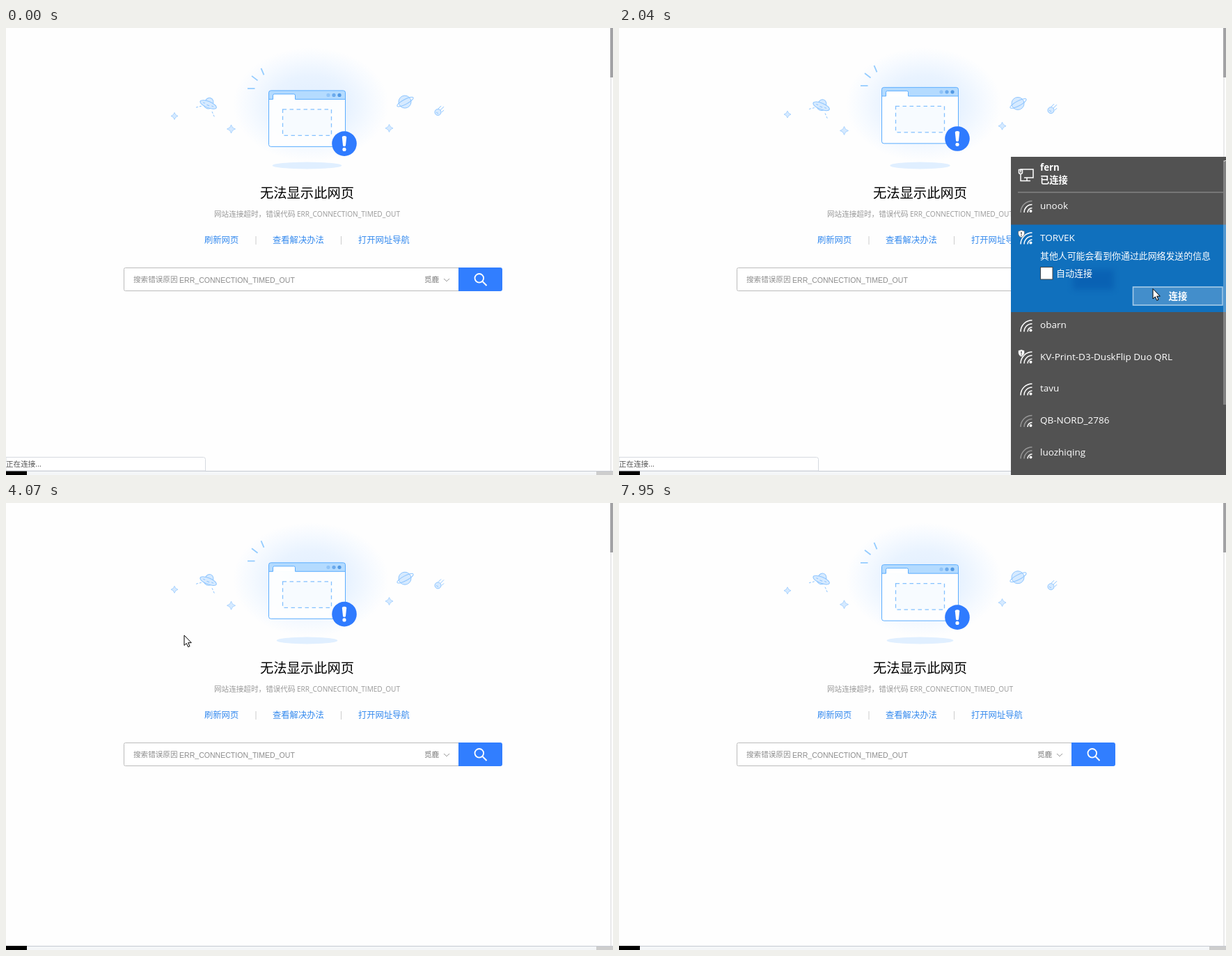
An HTML page that plays this animation: 872 px wide and 642 px high, repeating every 8000 ms.

```html
<!DOCTYPE html>
<html lang="zh-CN">
<head>
<meta charset="utf-8">
<title>无法显示此网页</title>
<style>
  html, body { margin: 0; width: 100%; height: 100%; overflow: hidden; background: #fefefe; }
  svg { display: block; width: 872px; height: 642px; }
  text { font-family: "Open Sans", "Noto Sans CJK SC", "Noto Sans CJK", sans-serif; white-space: pre; }
  #panel text { font-weight: 500; }
  #panel .bold { font-weight: 700; }
  .arial { font-family: "Liberation Sans", "Noto Sans CJK SC", "Noto Sans CJK", sans-serif; }
  .mid { text-anchor: middle; }
  .pale { fill: #d6eaff; stroke: #8dc5ff; stroke-width: 1; }
  .line { fill: none; stroke: #8dc5ff; stroke-width: 1; }
  .icon { fill: none; stroke: #fff; stroke-width: 1.5; }
</style>
</head>
<body>
<svg id="stage" viewBox="0 0 872 642"></svg>
<script>
const STEP = 203.85, LOOP = 8000, BOB = 1554;
const PANEL = [3, 20], EXPAND = 8, CONNECT = 12, STATUS_END = 15;

const label = (x, centre, size, fill, str, cls = '') =>
  `<text x="${x}" y="${centre + size * 0.37}" font-size="${size}" fill="${fill}" class="${cls}">${str}</text>`;
const rect = (x, y, w, h, fill, more = '') =>
  `<rect x="${x}" y="${y}" width="${w}" height="${h}" fill="${fill}" ${more}/>`;
// Group that floats vertically by "rise" pixels at the top of the bob.
const floating = (rise, body) => `<g data-rise="${rise}">${body}</g>`;
const star = (x, y, r, rise) => floating(rise,
  `<path class="pale" stroke-opacity=".7" d="M${x} ${y - r}Q${x + 1} ${y - 1} ${x + r} ${y}Q${x + 1} ${y + 1} ${x} ${y + r}Q${x - 1} ${y + 1} ${x - r} ${y}Q${x - 1} ${y - 1} ${x} ${y - r}z"/>`);

const art = `
  <ellipse cx="438" cy="110" rx="112" ry="82" fill="url(#halo)"/>
  <ellipse id="shadow" cx="0" cy="197.5" rx="50" ry="5" fill="#e0efff"/>
  ${floating(-5, `<path d="M347 87h10.500M353 69l8.500 6.500M366.500 58l4 9.500" fill="none" stroke="#94ccff" stroke-width="1.8"/>`)}
  ${star(242, 126.5, 5, -3)}${star(323.5, 145, 6, 3)}${star(550.5, 144, 5.5, -4)}
  ${floating(3, `<g transform="translate(291 109) rotate(22)">
      <path class="pale" d="M-6 -2a6 7 0 0 1 12 0z"/>
      <ellipse class="pale" cy="1" rx="12.500" ry="4.500"/>
      <path class="line" d="M-8 1h3M-2 2h4M5 1h3M-5 5q5 4 10 0"/></g>
      <path class="line" stroke-dasharray="3 2" d="M273 114l8 -2M296 120l4 9"/>`)}
  ${floating(3, `<circle class="pale" cx="573" cy="106" r="9"/>
      <ellipse class="line" cx="573.500" cy="106" rx="13" ry="3.500" transform="rotate(-28 573.500 106)"/>`)}
  ${floating(-3.5, `<circle class="pale" cx="620.500" cy="121" r="4.500"/>
      <path class="line" d="M621 116l4 -4M624 118l5 -5M626 121l3 -3M618 121l3 2"/>`)}
  ${floating(-5.7, `
    ${rect(377.5, 90, 110, 80.5, '#fff', 'rx="3" fill-opacity=".9"')}
    <path d="M377.500 102.500v-9.500q0 -3 3 -3h104q3 0 3 3v9.500z" fill="#b4dbff"/>
    <path d="M383.500 103v-6q0 -2 2 -2h28q2 0 2 2v6z" fill="#fff"/>
    <path d="M377.500 102.500h6v-5.500q0 -2 2 -2h28q2 0 2 2v5.500h72" fill="none" stroke="#5badff"/>
    ${rect(377.5, 90, 110, 80.5, 'none', 'rx="3" stroke="#5badff"')}
    <circle cx="463" cy="96.500" r="2.600" fill="#90c4f8"/>
    <circle cx="471" cy="96.500" r="2.600" fill="#6cabed"/>
    <circle cx="479" cy="96.500" r="2.600" fill="#5299e4"/>
    ${rect(397.5, 117, 70, 37.5, '#f7fbff', 'stroke="#84c1ff" stroke-width="1.3" stroke-dasharray="5.5 4.5"')}`)}
  ${floating(-9, `<circle cx="486" cy="166.300" r="17.800" fill="#2f7bff"/>
    <path d="M482.800 157.300q0 -2 3.200 -2t3.200 2l-1.200 11.500q-.3 1.500 -2 1.500t-2 -1.500z" fill="#fff"/>
    <circle cx="486" cy="174.600" r="2.600" fill="#fff"/>`)}`;

const page = `
  ${label(432.5, 236.5, 19.3, '#000', '无法显示此网页', 'mid')}
  ${label(299, 267, 10.6, '#999', '网站连接超时&#xff0c;错误代码')}
  ${label(418, 267, 10.1, '#999', 'ERR_CONNECTION_TIMED_OUT')}
  ${[[285, '刷新网页'], [383, '查看解决办法'], [506, '打开网址导航']].map(([x, s]) => label(x, 304.5, 12.3, '#3389ee', s)).join('')}
  ${rect(358.5, 299, 1, 12, '#ccc')}${rect(481, 299, 1, 12, '#ccc')}
  ${rect(169.5, 344.5, 485, 33, '#fff', 'rx="2" stroke="#bcbcbc"')}
  ${label(183, 361.5, 10.6, '#8c8c8c', '搜索错误原因')}
  ${label(249, 362, 10.56, '#8c8c8c', 'ERR_CONNECTION_TIMED_OUT', 'arial')}
  ${label(601, 361.5, 10.6, '#777', '觅鹿')}
  <path d="M629 360l4 3.800l4 -3.800" fill="none" stroke="#999"/>
  <path d="M650 344h60q3 0 3 3v28q0 3 -3 3h-60z" fill="#317eff"/>
  <path d="M684.500 364l6 6" stroke="#fff" stroke-width="2"/>
  <circle cx="679.800" cy="359.300" r="6.300" fill="none" stroke="#fff" stroke-width="1.800"/>
  ${rect(868.5, 0, 1, 636, '#d4d4d8')}${rect(868, 0, 4, 71, '#a2a2a4')}
  ${rect(0, 636, 872, 6, '#f4f6f8')}${rect(0, 636, 872, 1, '#c6cad2')}
  ${rect(0, 636, 30, 6, '#000')}${rect(848, 637, 24, 5, '#cdcdcd')}
  <g id="status"><path d="M0 616.500h283.500q3 0 3 3v16.500h-286.500z" fill="#fff" stroke="#d6dae0"/>
  ${label(0, 626, 10.6, '#555', '正在连接...')}</g>`;

// name, number of bright arcs, shield
const networks = [
  ['unook', 2], ['TORVEK', 3, 1], ['obarn', 3], ['KV-Print-D3-DuskFlip Duo QRL', 3, 1], ['tavu', 3],
  ['QB-NORD_2786', 1], ['luozhiqing', 1], ['VQN-2.4G-K27F58', 1], ['ThrumNet-krtB', 1]
];
const ROW = 45.6, rowTop = i => 237.4 + ROW * i;

const wifi = (y, bright) => `<circle cx="591.500" cy="${y + 7}" r="2" fill="#fff"/>` +
  [6.5, 11.5, 16.5].map((r, i) =>
    `<path class="icon" stroke-opacity="${i < bright ? 1 : 0.4}" d="M${593.5 - r} ${y + 9}a${r} ${r} 0 0 1 ${r} ${-r}"/>`).join('');
const shield = y => `<path d="M578 ${y - 11}l4.500 1.500v3q0 4 -4.500 6q-4.500 -2 -4.500 -6v-3z" fill="#fff" stroke="#525252" stroke-width=".6"/>
  <path d="M578 ${y - 8.5}v3.500M578 ${y - 4}v1.300" stroke="#444" stroke-width="1.300"/>`;
const row = ([name, bright, guarded], i) => {
  const y = 255 + ROW * i;
  return `<g class="row">${wifi(y + 1, bright)}${guarded ? shield(y + 1) : ''}${label(605, y, 13.5, '#fff', name)}</g>`;
};

const panel = `<g id="panel">
  ${rect(563, 185, 309, 457, '#525252')}
  <rect id="hover" x="563" width="305" height="45.600" fill="#646666"/>
  <rect id="chosen" x="563" y="282.500" width="309"/>
  <rect id="ghost" x="652" y="347" width="59" height="29" filter="url(#blur)"/>
  <rect id="thumb" x="868" y="190" width="4" fill="#fff" fill-opacity=".28"/>
  <path d="M869 192l2 -2l1 1" fill="none" stroke="#ddd"/>
  <path class="icon" d="M577 207.500v-4.500h18v12h-13M586 215v4.500M580 219.500h11M574.500 203.500h5v4q0 2 -2.500 2t-2.500 -2zM577 210v9.500h4"/>
  ${label(605, 200.5, 13.3, '#fff', 'fern', 'bold')}${label(605, 218, 13.3, '#fff', '已连接', 'bold')}
  ${rect(573, 235.5, 295, 1, '#9a9a9a')}
  ${networks.map(row).join('')}
  <g id="prompt">
    ${label(605, 327.5, 12.9, '#fff', '其他人可能会看到你通过此网络发送的信息')}
    ${rect(605.5, 343.5, 17.5, 17.5, '#fff', 'stroke="#444"')}
    ${label(628, 352, 13, '#fff', '自动连接')}
    ${rect(738.5, 371.5, 128.5, 27, '#438ecb')}
    <rect id="focus" x="738.500" y="372" width="128.500" height="26" fill="none" stroke="#a6cbe8" stroke-width="1.600"/>
    ${label(803, 385.5, 13.4, '#fff', '连接', 'mid bold')}
  </g>
  <g id="linking">
    ${label(605, 331, 13, '#fff', '正在连接')}
    ${rect(738, 339.5, 130, 28, '#4f88b7')}
    ${label(803, 354, 13.4, '#fff', '取消', 'mid bold')}
    ${'<circle class="bead" cy="321.500" r="1.800" fill="#0f7ad8"/>'.repeat(5)}
  </g></g>`;

const stage = document.getElementById('stage');
stage.innerHTML = `<defs>
  <radialGradient id="halo"><stop offset="0" stop-color="#e0eeff"/><stop offset=".5" stop-color="#e9f3ff"/>
    <stop offset=".8" stop-color="#f6faff"/><stop offset="1" stop-color="#fefefe"/></radialGradient>
  <filter id="blur" x="-25%" y="-50%" width="150%" height="200%"><feGaussianBlur stdDeviation="4"/></filter></defs>
  ${rect(0, 0, 872, 642, '#fefefe')}${art}${page}${panel}
  <path id="cursor" d="M0 0v14.500l3.300 -3l2.300 5.200l2.400 -1l-2.300 -5h4.600z" fill="#fff" stroke="#000" stroke-linejoin="round"/>`;

const el = id => document.getElementById(id);
const all = q => [...stage.querySelectorAll(q)];
const show = (id, on) => el(id).setAttribute('display', on ? 'inline' : 'none');
const set = (id, attrs) => Object.entries(attrs).forEach(([k, v]) => el(id).setAttribute(k, v));
const floats = all('[data-rise]'), rows = all('.row'), beads = all('.bead');

// step, x, y
const route = [[3, 690, 520], [6, 629.5, 300.5], [8, 630, 301], [10, 767, 374.5], [12, 769, 380],
  [18, 255.5, 190.5], [20, 256, 190], [24, 316, 99.5], [25, 340, 13]];
function pointer(k) {
  const i = Math.min(route.length - 2, Math.max(0, route.findIndex(p => p[0] > k) - 1));
  const [a, b] = k >= 25 ? route.slice(-2) : [route[i], route[i + 1]];
  const u = (k - a[0]) / (b[0] - a[0]);
  return [a[1] + (b[1] - a[1]) * u, a[2] + (b[2] - a[2]) * u];
}

function drawPanel(k, [x, y]) {
  const mode = k < EXPAND ? 0 : k < CONNECT ? 1 : 2;
  const shift = [0, 80, 48.5][mode];
  rows.forEach((r, i) => r.setAttribute('transform', `translate(0 ${i > 1 ? shift : 0})`));
  set('thumb', { height: [407, 351, 370][mode] });
  set('chosen', { height: [0, 125.5, 93.5][mode], fill: mode === 1 ? '#1070bd' : '#2269a5' });
  set('ghost', { fill: mode ? '#004ea6' : '#10295e', opacity: [0.62, 0.4, 0.6][mode] });
  set('hover', { y: rowTop(Math.floor((y - rowTop(0)) / ROW)) });
  show('hover', mode === 0);
  show('prompt', mode === 1);
  show('linking', mode === 2);
  show('focus', x > 738 && y > 371);
  beads.forEach((b, i) => {
    const q = 2 * (0.62 + (k - 18) * 0.085 - i * 0.1) - 1;
    b.setAttribute('cx', 715.5 + 152.5 * (0.35 * q + 0.65 * q ** 3));
    b.setAttribute('display', Math.abs(q) < 1 ? 'inline' : 'none');
  });
}

function draw(k) {
  const lift = (1 - Math.cos(2 * Math.PI * (k * STEP / BOB + 0.047))) / 2;
  floats.forEach(g => g.setAttribute('transform', `translate(0 ${(g.dataset.rise * lift).toFixed(2)})`));
  set('shadow', { transform: `translate(432.5 0) scale(${1 - 0.165 * lift} 1)` });
  show('status', k < STATUS_END);
  const open = k >= PANEL[0] && k < PANEL[1], at = pointer(k);
  show('panel', open);
  if (open) drawPanel(k, at);
  show('cursor', k >= 3 && k <= 25);
  set('cursor', { transform: `translate(${at})` });
}

let last = -1;
function tick() {
  const k = Math.min(39, Math.floor((performance.now() % LOOP + 13) / STEP));
  if (k !== last) draw(last = k);
  requestAnimationFrame(tick);
}
tick();
</script>
</body>
</html>
```
